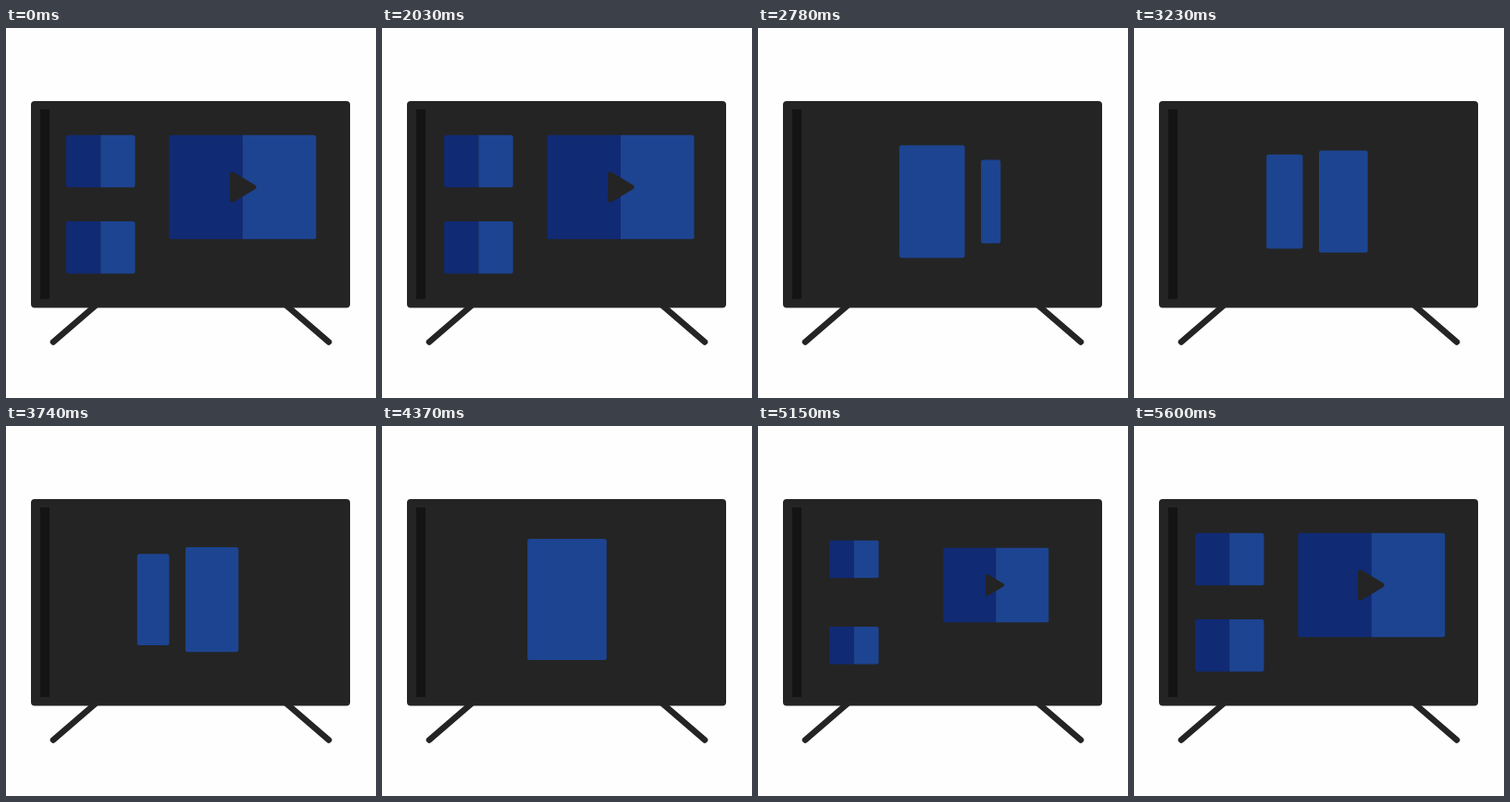
These frames come from a looping animation (400x400 px, 5630 ms). An HTML page with a canvas:

```html
<!DOCTYPE html>
<html lang="en">
<head>
<meta charset="utf-8">
<title>TV screen</title>
<style>
html, body { margin: 0; width: 100%; height: 100%; overflow: hidden; background: #fefefe; }
canvas { display: block; }
</style>
</head>
<body>
<canvas id="stage" width="400" height="400"></canvas>
<script>
const ctx = document.getElementById('stage').getContext('2d');
const LOOP = 5630;
const BODY = '#242424', BAR = '#141414', DARK = '#102a74', LIGHT = '#1d4491';
const PHONE = { x: 200, y: 187.7, w: 85.5, h: 131 };
const SLIVER = { w: 6.5, h: 81, shift: 63.5 };
const SWAPS = [2548, 3070, 3591], SWAP_TIME = 297;

const clamp = v => Math.min(1, Math.max(0, v));
const progress = (t, start, length) => clamp((t - start) / length);
const mix = (a, b, p) => a + (b - a) * p;

function box(x, y, w, h, r, color) {
  ctx.beginPath();
  ctx.roundRect(x, y, w, h, r);
  ctx.fillStyle = color;
  ctx.fill();
}

function clipped(x, y, w, h, draw) {
  ctx.save();
  ctx.beginPath();
  ctx.rect(x, y, w, h);
  ctx.clip();
  draw();
  ctx.restore();
}

function line(...points) {
  ctx.beginPath();
  points.forEach(([x, y]) => ctx.lineTo(x, y));
  ctx.stroke();
}

function tv() {
  ctx.strokeStyle = BODY;
  ctx.lineCap = ctx.lineJoin = 'round';
  ctx.lineWidth = 6.5;
  line([98, 299], [51, 339.5]);
  line([302, 299], [349, 339.5]);
  box(27, 79, 345, 223.5, 4, BODY);
  box(37, 88, 10, 205, 0, BAR);
}

function scaled(cx, cy, scale, draw) {
  ctx.save();
  ctx.translate(cx, cy);
  ctx.scale(scale, scale);
  draw();
  ctx.restore();
}

function panel(cx, cy, w, h, scale) {
  scaled(cx, cy, scale, () => {
    box(-w / 2, -h / 2, w / 2, h, [2.5, 0, 0, 2.5], DARK);
    box(0, -h / 2, w / 2, h, [0, 2.5, 2.5, 0], LIGHT);
  });
}

function panels(dx, iconDx, scale) {
  panel(102.3 + dx, 144, 74.5, 56.5, scale);
  panel(102.3 + dx, 237.3, 74.5, 56.5, scale);
  panel(255.8 + dx, 172, 159, 112.5, scale);
  scaled(255.8 + iconDx, 172, scale, () => {
    ctx.fillStyle = ctx.strokeStyle = BODY;
    ctx.lineWidth = 5;
    ctx.beginPath();
    ctx.moveTo(-11.2, -14);
    ctx.lineTo(-11.2, 14);
    ctx.lineTo(12.2, 0);
    ctx.closePath();
    ctx.fill();
    ctx.stroke();
  });
}

// size 1 is the full phone, 0 the sliver at the given side
function phone(size, side, lift = 0, stretch = 1) {
  const w = mix(SLIVER.w, PHONE.w, size);
  const h = mix(SLIVER.h, PHONE.h, size) * stretch;
  const x = PHONE.x + side * SLIVER.shift * (1 - size);
  box(x - w / 2, PHONE.y - lift - h / 2, w, h, 2.5, LIGHT);
}

function swapEase(x) {
  const u = x ** 1.33;
  return u * u * (3 - 2 * u);
}

function phones(t) {
  const start = SWAPS.find(s => t >= s && t < s + SWAP_TIME);
  if (start) {
    const p = swapEase((t - start) / SWAP_TIME);
    phone(p, -1);
    phone(1 - p, 1);
    return;
  }
  const grow = 1 - (1 - progress(t, 2280, 250)) ** 3;
  const x = Math.max(0, (t - 4290) / 590);
  const lift = 4 * x * x + 27 * x ** 8.5;
  clipped(27, 88, 345, 205, () => phone(1, 0, lift, grow));
}

function render(t) {
  ctx.clearRect(0, 0, 400, 400);
  tv();
  if (t < 2400) {
    const dx = t < 2030 ? 0 : 2 * ((t - 2000) / 30) ** 2;
    clipped(27, 79, 345, 223, () => panels(dx, dx, 1));
  }
  if (t > 2280 && t < 5050) phones(t);
  if (t > 5010) {
    const scale = 1 - (1 - progress(t, 5010, 410)) ** 3;
    panels(mix(1.4, 0.9, progress(t, 5420, 180)), 0, scale);
  }
}

const begin = performance.now();
function tick() {
  render((performance.now() - begin) % LOOP);
  requestAnimationFrame(tick);
}
tick();
</script>
</body>
</html>
```
